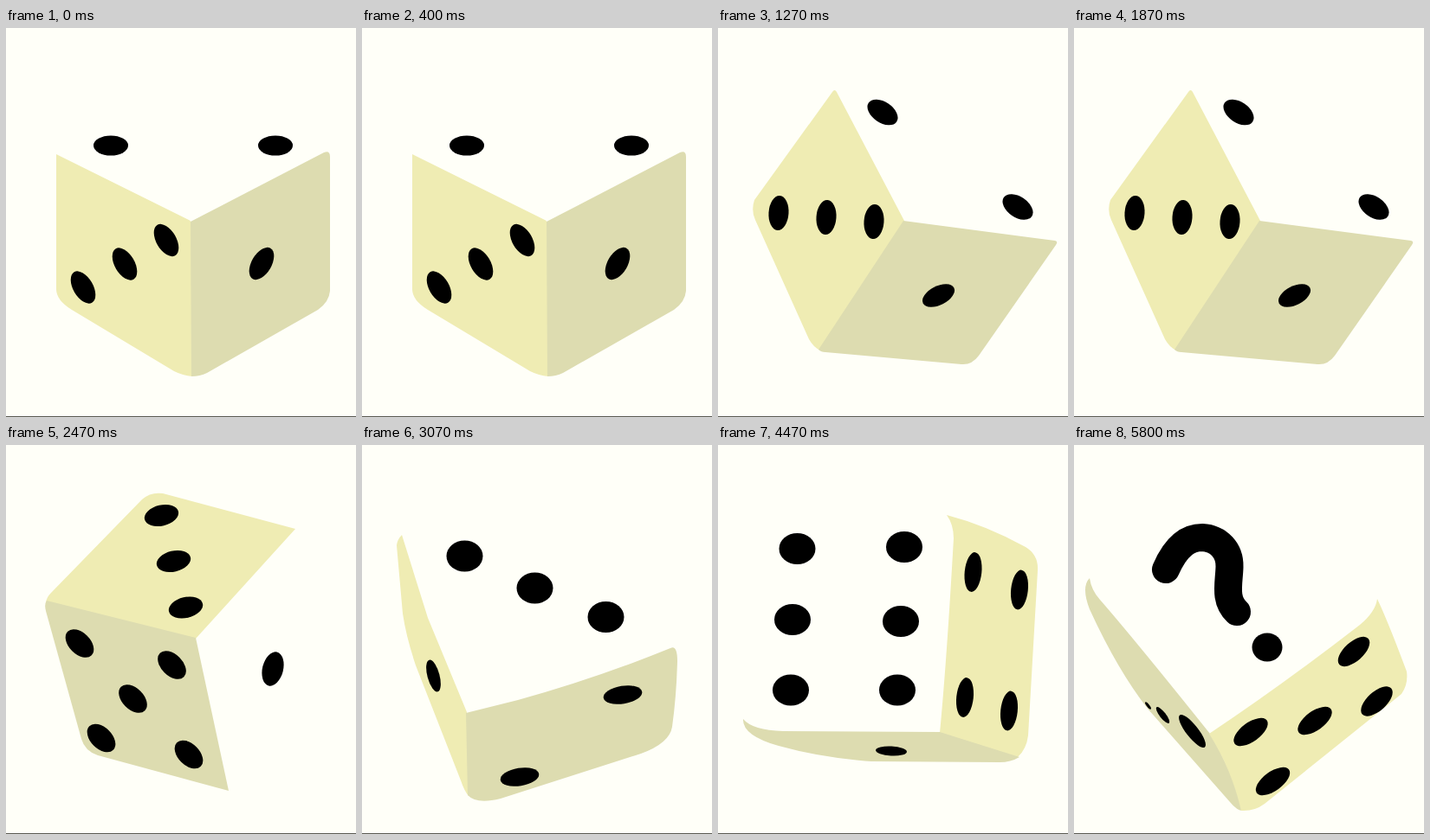
These frames come from a looping animation (404 by 450 pixels, 5870 ms). An HTML page:

```html
<!DOCTYPE html>
<html lang="en">
<head>
<meta charset="utf-8">
<title>Dice</title>
<style>
  html, body { margin: 0; width: 100%; height: 100%; overflow: hidden; background: #fffff8; }
  .stage { position: relative; width: 404px; height: 450px; overflow: hidden; }
  .stage::after { content: ""; position: absolute; left: 0; top: 449px; width: 404px; height: 1px; background: #5a5a52; }
  .strip { display: block; animation: deal 5.87s step-end infinite; }
  .lit { fill: #efecb3; }
  .dim { fill: #dddcb0; }
  .mark { fill: none; stroke: #000; stroke-width: 32; stroke-linecap: round; }
  /* one pose after another, hard cuts */
  @keyframes deal {
    0% { transform: translateX(0); }
    15.8% { transform: translateX(-404px); }
    32.8% { transform: translateX(-808px); }
    49.9% { transform: translateX(-1212px); }
    66.9% { transform: translateX(-1616px); }
    83.95% { transform: translateX(-2020px); }
  }
</style>
</head>
<body>
<div class="stage">
<svg class="strip" width="2424" height="450" viewBox="0 0 2424 450">
  <defs>
    <ellipse id="flat" rx="20" ry="11.5"/>
    <ellipse id="left" rx="20.5" ry="11.5" transform="rotate(60)"/>
    <ellipse id="right" rx="20.5" ry="11.5" transform="rotate(-60)"/>
    <ellipse id="slant" rx="19.5" ry="12" transform="rotate(34)"/>
    <ellipse id="upright" rx="20" ry="11.5" transform="rotate(94)"/>
    <ellipse id="rise" rx="20" ry="11" transform="rotate(-27)"/>
    <ellipse id="roof" rx="20" ry="12" transform="rotate(-13)"/>
    <ellipse id="front" rx="19.5" ry="12.3" transform="rotate(45)"/>
    <ellipse id="side" rx="20" ry="12" transform="rotate(-76)"/>
    <ellipse id="round" rx="21" ry="18"/>
    <ellipse id="thin" rx="19" ry="7" transform="rotate(75)"/>
    <ellipse id="low" rx="22.5" ry="10.3" transform="rotate(-9)"/>
    <ellipse id="tall" rx="23" ry="9.8" transform="rotate(-84)"/>
    <ellipse id="under" rx="18" ry="5.5" transform="rotate(3)"/>
    <ellipse id="tilt" rx="23" ry="11" transform="rotate(-36)"/>
    <ellipse id="steep" rx="22.5" ry="11" transform="rotate(-42)"/>
    <ellipse id="sliver" rx="23.5" ry="7" transform="rotate(52)"/>
  </defs>

  <g>
    <path class="lit" d="M58 146L211 222Q214 223 214 228L215 403Q204 402 194 397L76 326Q58 315 58 302Z"/>
    <path class="dim" d="M213 224L367 144Q374 141 374 149L374 304Q373 317 360 326L232 399Q224 403 214 403Z"/>
    <use href="#flat" x="121" y="136"/>
    <use href="#flat" x="311" y="136"/>
    <use href="#left" x="89" y="300"/>
    <use href="#left" x="137" y="273"/>
    <use href="#left" x="185" y="245.5"/>
    <use href="#right" x="295" y="272.5"/>
  </g>

  <g transform="translate(404)">
    <path class="lit" d="M132 74Q135 69 138 76L215 223L118 373Q110 369 105 360L43 222Q38 211 42 199Z"/>
    <path class="dim" d="M214 223L389 246Q393 247 390 251L301 379Q293 390 281 389L124 375Q119 375 116 372Z"/>
    <use href="#slant" x="190" y="97.5"/>
    <use href="#slant" x="346" y="207"/>
    <use href="#upright" x="70" y="214"/>
    <use href="#upright" x="125" y="219"/>
    <use href="#upright" x="180" y="224"/>
    <use href="#rise" x="254.5" y="309.5"/>
  </g>

  <g transform="translate(808)">
    <path class="lit" d="M334 97L219 224L46 182Q47 176 52 171L157 63Q167 54 181 56Z"/>
    <path class="dim" d="M47 180L219 223L257 400L106 359Q91 354 87 340L46 192Q44 184 47 180Z"/>
    <use href="#roof" x="179.5" y="81.5"/>
    <use href="#roof" x="193.5" y="134.5"/>
    <use href="#roof" x="207.5" y="188"/>
    <use href="#front" x="85" y="229.5"/>
    <use href="#front" x="191.5" y="254.5"/>
    <use href="#front" x="146.5" y="293.5"/>
    <use href="#front" x="110" y="339"/>
    <use href="#front" x="211" y="358"/>
    <use href="#side" x="308" y="259"/>
  </g>

  <g transform="translate(1212)">
    <path class="lit" d="M46 104L76 200L121 309L123 406Q118 400 114 388L62 255Q51 222 47 195L40 116Q41 109 46 104Z"/>
    <path class="dim" d="M120 310L180 295Q270 270 356 235Q364 231 364 250Q363 290 358 326Q355 345 322 357L160 409Q132 416 122 405Z"/>
    <use href="#round" x="118.5" y="128.5"/>
    <use href="#round" x="199.5" y="165.5"/>
    <use href="#round" x="281.5" y="199"/>
    <use href="#thin" x="82.5" y="267"/>
    <use href="#low" x="182" y="384"/>
    <use href="#low" x="301" y="289"/>
  </g>

  <g transform="translate(1616)">
    <path class="lit" d="M264 81Q310 93 355 118Q370 127 369 145L358 336Q356 352 346 361L256 333Q264 250 272 108Q272 92 264 81Z"/>
    <path class="dim" d="M29 317Q40 330 75 331L256 332L348 361Q338 367 325 367L177 366Q120 362 70 348Q28 336 29 317Z"/>
    <use href="#round" x="91.5" y="120"/>
    <use href="#round" x="215" y="118"/>
    <use href="#round" x="86" y="202"/>
    <use href="#round" x="211" y="204"/>
    <use href="#round" x="84" y="283.5"/>
    <use href="#round" x="207" y="283.5"/>
    <use href="#tall" x="294.5" y="147"/>
    <use href="#tall" x="348" y="167.5"/>
    <use href="#tall" x="285" y="292"/>
    <use href="#tall" x="336" y="307.5"/>
    <use href="#under" x="200" y="354"/>
  </g>

  <g transform="translate(2020)">
    <path class="dim" d="M18 154Q20 168 30 179Q70 225 157 334Q182 375 195 423Q188 423 180 413L85 305Q50 260 18 190Q8 164 18 154Z"/>
    <path class="lit" d="M156 334Q240 278 330 208Q348 193 350 178Q362 203 384 262Q386 277 378 288L220 415Q208 424 193 423Q182 375 156 334Z"/>
    <path class="mark" d="M106 144C119 114 134 107 148 107C167 108 180 122 179.500 141C179 160 173 179 188 193"/>
    <ellipse cx="223" cy="234" rx="17.5" ry="16.5"/>
    <use href="#tilt" x="204" y="332"/>
    <use href="#tilt" x="278" y="319"/>
    <use href="#tilt" x="229.5" y="389"/>
    <use href="#steep" x="323" y="239"/>
    <use href="#steep" x="349.5" y="296.5"/>
    <use href="#sliver" x="136.5" y="331"/>
    <use href="#sliver" transform="translate(102.5 312.5) scale(.5)"/>
    <use href="#sliver" transform="translate(85.5 301.5) scale(.22)"/>
  </g>
</svg>
</div>
</body>
</html>
```
